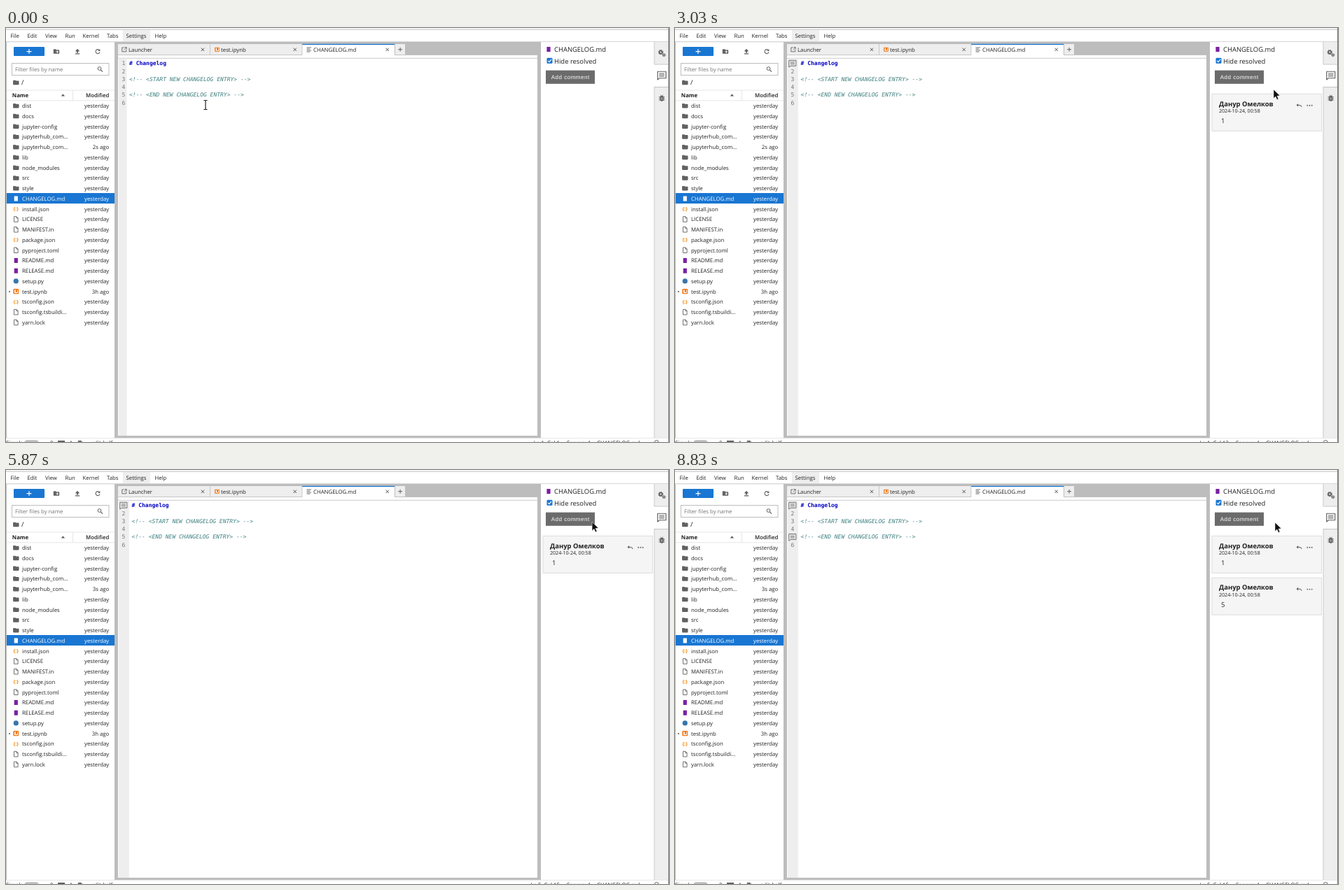
These frames come from a looping animation (947x592 px, 9230 ms). An HTML page:

```html
<!DOCTYPE html>
<html lang="en">
<head>
<meta charset="utf-8">
<title>Notebook comments</title>
<style>
  html, body { margin: 0; width: 100%; height: 100%; overflow: hidden; background: #fff; }
  svg { display: block; font: 7.8px "Open Sans", "Noto Sans", sans-serif; fill: #212121; text-rendering: geometricPrecision; }
  text { white-space: pre; }
  .mono { font-family: "DejaVu Sans Mono", monospace; font-size: 8px; }
  .note { fill: #408080; font-style: italic; }
  .head { fill: #0606c4; font-weight: bold; }
  .num { fill: #777; text-anchor: end; }
  .end { text-anchor: end; }
  .mid { text-anchor: middle; }
  .semi { font-weight: 600; }
  .bold { font-weight: bold; }
  .big { font-size: 9.45px; }
  .title { font-size: 10.5px; font-weight: bold; }
  .small { font-size: 7.1px; }
  .btn { font-family: "Liberation Sans", Arial, sans-serif; font-size: 8px; letter-spacing: .5px; }
  .dim { fill: #757575; }
  .white { fill: #fff; }
</style>
</head>
<body>
<svg id="stage" width="947" height="592" viewBox="0 0 947 592" xmlns="http://www.w3.org/2000/svg"></svg>
<script>
const LOOP = 9230;
const USER = "Данур Омелков";
const BLUE = "#1976d2", GREY = "#616161", LINE = "#bdbdbd", BUTTON = "#6b6b6b";

const rect = (x, y, w, h, fill, more = "") =>
  `<rect x="${x}" y="${y}" width="${w}" height="${h}" fill="${fill}" ${more}/>`;
const text = (x, y, str, cls = "", more = "") =>
  `<text x="${x}" y="${y}" class="${cls}" ${more}>${str.replace(/</g, "&lt;")}</text>`;
const path = (d, fill, more = "") => `<path d="${d}" fill="${fill}" ${more}/>`;
const line = (d, color = GREY, width = 1) =>
  path(d, "none", `stroke="${color}" stroke-width="${width}"`);
const group = (id, body, x = 0, y = 0) =>
  `<g id="${id}" transform="translate(${x} ${y})">${body}</g>`;
const at = (x, y, body, k = 1) => `<g transform="translate(${x} ${y}) scale(${k})">${body}</g>`;

// Icons are centred on 0,0
const icons = {
  folder: () => path("M-4.2-2.5Q-4.2-3.3-3.4-3.3H-.9L0-2.4H3.4Q4.2-2.4 4.2-1.6V2.4Q4.2 3.2 3.4 3.2H-3.4Q-4.2 3.2-4.2 2.4Z", GREY),
  md: c => rect(-2.6, -3.5, 5.2, 7, c || "#7b1fa2"),
  json: () => text(0, 2.5, "{:}", "mid bold", 'font-size="7" style="fill:#ef8a10"'),
  file: () => line("M-2.8-3.8H.8L2.8-1.8V3.8H-2.8ZM.6-3.8V-1.6H2.8", GREY, .9),
  py: () => `<circle r="3.6" fill="#3776ab"/>`,
  book: () => rect(-3.8, -3.6, 7.6, 7.2, "#ef6c00", 'rx=".8"') +
    rect(-2.3, -2.4, 5, 4.8, "#fff") + path("M-.6-2.4H1.8V1.6L.6.5-.6 1.6Z", "#ef6c00"),
  bubble: () => path("M-5-4.5H5V3.4H-2.8L-5 5.2Z", "#fff", `stroke="${GREY}" stroke-width=".95" stroke-linejoin="round"`) +
    line("M-3.2-2.2H3.2M-3.2-.5H3.2M-3.2 1.2H3.2", GREY, .8),
  close: () => line("M-2.2-2.2L2.2 2.2M2.2-2.2L-2.2 2.2", "#444", .9),
  gear: () => `<circle r="2.2" fill="none" stroke="${GREY}" stroke-width="1.9"/>` +
    `<circle r="3.4" fill="none" stroke="${GREY}" stroke-width="1.4" stroke-dasharray="1.5 1.17"/>`,
  bug: () => path("M-2.6-1.4Q-2.6-3.6 0-3.6T2.6-1.4V1.4Q2.6 4.4 0 4.4T-2.6 1.4Z", GREY) +
    line("M-4.2-1.6H4.2M-4.2.6H4.2M-4.2 2.8H4.2M-1.8-4.6L-.8-3.4M1.8-4.6L.8-3.4", GREY, .9) +
    line("M-1.1-.3H1.1M-1.1 1.6H1.1", "#fff", .7),
};

const button = (x, y, w, h, label, fill = BUTTON, id = "") =>
  rect(x, y, w, h, fill, id && `id="${id}"`) +
  text(x + w / 2 + .2, y + h / 2 + 2.7, label, "btn mid white");

function menuBar() {
  const items = [["File", 6.5], ["Edit", 30.5], ["View", 56], ["Run", 84.5], ["Kernel", 109.5],
    ["Tabs", 144], ["Settings", 171.5], ["Help", 212.5]];
  return rect(0, 1.5, 947, 1.2, "#c8c8c8") + rect(167, 3, 39, 16, "#eee") +
    items.map(([s, x]) => text(x, 13.6, s)).join("") + rect(0, 19.4, 947, .8, LINE);
}

function fileBrowser() {
  const files = `folder dist,folder docs,folder jupyter-config,folder jupyterhub_com…,folder jupyterhub_com…,
    folder lib,folder node_modules,folder src,folder style,md CHANGELOG.md,json install.json,file LICENSE,
    file MANIFEST.in,json package.json,file pyproject.toml,md README.md,md RELEASE.md,py setup.py,
    book test.ipynb,json tsconfig.json,file tsconfig.tsbuildi…,file yarn.lock`
    .split(",").map(s => s.trim().split(" "));
  const rows = files.map(([kind, name], i) => {
    const y = 111.2 + i * 14.75, on = i === 9, cls = on ? "white" : "";
    const when = i === 4 ? "2s ago" : i === 18 ? "3h ago" : "yesterday";
    return (on ? rect(1, 236, 154, 15, BLUE) : "") +
      at(14.3, y, icons[kind](on && "#fff")) + text(23, y + 2.9, name, cls) +
      text(147.3, y + 2.9, when, "end " + cls, i === 4 ? 'id="ago"' : "") +
      (i === 18 ? `<circle cx="5" cy="${y + .3}" r="1.1" fill="${GREY}"/>` : "");
  }).join("");
  return rect(0, 20, 1, 566, LINE) +
    rect(11, 27, 44, 13, BLUE, 'rx="1"') + line("M29.5 33.6H36.5M33 30.1V37.1", "#fff", 1.1) +
    at(72, 33.6, icons.folder() + line("M1.3-1.5V2.3M-.6.4H3.2", "#fff", .9)) +
    path("M102 29.7L105.2 33.2H103.2V35.4H100.8V33.2H98.8ZM98.8 36.3H105.2V37.5H98.8Z", GREY) +
    line("M133.5 31.8A3 3 0 1 0 134 34.3", GREY, 1.1) + path("M134.3 29.9V33H131.2Z", GREY) +
    rect(8.5, 50.5, 138.5, 17, "#fff", `stroke="${LINE}" stroke-width="1"`) +
    text(13, 62, "Filter files by name", "dim") +
    `<circle cx="133.5" cy="58" r="2.4" fill="none" stroke="${GREY}"/>` + line("M135.3 59.8L138 62.5", GREY, 1.2) +
    at(14.3, 78, icons.folder()) + text(22, 81.4, "/", "big") +
    rect(1, 88.6, 154, .8, "#e0e0e0") + rect(1, 103.4, 154, .8, "#e0e0e0") + rect(95, 89, .8, 15, "#e0e0e0") +
    text(8.8, 98.6, "Name", "bold") + path("M78.7 97.4L81.4 94.2 84.1 97.4Z", GREY) +
    text(147.3, 99.4, "Modified", "end semi") + rows;
}

function editor() {
  const tab = (x, name, icon) => text(x, 33.6, name) + icon;
  const code = [["# Changelog", "head"], , ["<!-- <START NEW CHANGELOG ENTRY> -->", "note"], ,
    ["<!-- <END NEW CHANGELOG ENTRY> -->", "note"]];
  const lineY = i => 53.4 + i * 11.25;
  let nums = "", body = "";
  for (let i = 0; i < 6; i++) {
    nums += text(170.3, lineY(i), String(i + 1), "mono num", `id="n${i + 1}"`);
    if (code[i]) body += text(176, lineY(i), code[i][0], "mono " + code[i][1]);
  }
  return rect(155, 20, 609, 566.5, LINE) + rect(160, 23, 395, 15.5, "#eee") +
    rect(160, 38.5, 599, 544.5, "#fff") + rect(160, 38, 263, .8, LINE) + rect(555, 38, 204, .8, LINE) +
    rect(423, 23, 132, 16, "#fff") + rect(423, 22.8, 132, 1.3, BLUE) +
    rect(160, 42.8, 599, .8, LINE) +
    [291, 422.5, 555].map(x => rect(x, 23, .8, 15.5, LINE)).join("") +
    tab(175, "Launcher", line("M168.5 28H165.8V33.8H171.8V31M169.5 27.6H172.2V30.3M172 27.8L168.6 31.2", GREY, .9)) +
    tab(307, "test.ipynb", at(301.5, 30.7, icons.book(), .85)) +
    tab(439, "CHANGELOG.md", line("M429.5 28H436M429.5 30H434M429.5 32H436M429.5 34H434.5", GREY, .9)) +
    [281, 412.7, 544.7].map(x => at(x, 30.8, icons.close())).join("") +
    rect(556, 23, 14, 15, "#eee") +
    line("M560.2 30.7H566M563.1 27.8V33.6", GREY, 1) +
    rect(161, 43.6, 11.5, 539.4, "#eee", 'id="gutter"') + nums + group("code", body) +
    group("mark1", icons.bubble(), 167.8, 50.8) + group("mark2", icons.bubble(), 167.8, 96) +
    rect(0, 0, 1, 10, "#000", 'id="caret"');
}

function commentCard(id, str) {
  return group(id, rect(767, .5, 156.5, 53, "#f5f5f5", 'stroke="#ddd" stroke-width="1"') +
    text(777, 17.8, USER, "bold", 'font-size="9.45"') + text(777, 27.6, "2024-10-24, 00:58", "small") +
    text(780, 42.4, str, "big") +
    line("M888.6 16.5H892Q895 16.5 895 19.2", GREY, 1) + path("M887.5 16.5L890.2 14.2V18.8Z", GREY) +
    [903.3, 906.5, 909.7].map(x => `<circle cx="${x}" cy="17" r=".95" fill="${GREY}"/>`).join(""));
}

function sidePanel() {
  return rect(764, 20, 162, 566, "#fff") + at(775, 30.5, icons.md()) +
    text(783, 34.2, "CHANGELOG.md", "big") +
    rect(772.5, 42.8, 8, 8, BLUE, 'rx="1.2"') + line("M774.2 46.9L775.9 48.6 779 44.9", "#fff", 1.2) +
    text(783, 50.5, "Hide resolved", "big") +
    group("addNew", button(771, 60.6, 70, 19.2, "Add comment")) +
    group("form", rect(767, 66.5, 156.5, 88, "#f5f5f5", 'stroke="#e4e4e4" stroke-width="1"') +
      text(774, 82, USER, "title") +
      rect(774.3, 91.8, 142.2, 28.6, "#e0e0e0", 'stroke="#6aaae4" stroke-width="1.8"') +
      text(779.5, 103.8, "Comment", "mono dim", 'id="hint" style="font-size:9.6px"') +
      text(779.5, 103.8, "", "mono", 'id="draft" style="font-size:9.6px"') +
      rect(779.3, 95, 1, 12, "#222", 'id="inputCaret"') +
      button(840, 126.8, 43, 19.2, "Cancel") + button(885, 126.8, 30.5, 19.2, "Add", "#b3b3b3", "send")) +
    commentCard("card1", "1") + commentCard("card2", "5") +
    rect(926, 20, 21, 566, "#eee") + rect(926, 52, 21, 32, "#fff") + rect(925.6, 20, .8, 32, LINE) +
    rect(925.6, 84, .8, 502, LINE) + rect(926, 51.6, 21, .8, LINE) + rect(926, 84, 21, .8, LINE) +
    at(935.2, 34.6, icons.gear(), .9) + at(939.8, 38.6, icons.gear(), .62) +
    at(936.7, 67.7, icons.bubble(), 1.2) + at(936.7, 100.3, icons.bug()) +
    rect(946, 0, 1, 592, "#777");
}

function statusBar() {
  return rect(0, 586.5, 946, 5.5, "#fff") + rect(0, 586.3, 946, .7, "#ddd") +
    text(0, 595.5, "Simple") + rect(26, 589.3, 21, 9, LINE, 'rx="4.5"') +
    text(63, 595.5, "0") + rect(74, 590, 10, 8, GREY) + text(90, 595.5, "4") +
    at(105.5, 593.5, icons.gear()) + text(122, 595.5, "edit-half") +
    text(791, 595.5, "", "end", 'id="place"') + text(801, 595.5, "Spaces: 4") +
    text(844, 595.5, "CHANGELOG.md") + line("M926.5 594V592Q926.5 589.6 929.3 589.6T932 592V594", GREY, 1);
}

const arrow = path("M0 0V12.6L2.9 10 4.9 14.4 7 13.4 5 9.2 9 8.8Z", "#111", 'stroke="#fff" stroke-width=".5"');
const beam = line("M-2.6-6.5H-1Q0-6.5 0-5.5V5.5Q0 6.5-1 6.5H-2.6M2.6-6.5H1Q0-6.5 0-5.5M2.6 6.5H1Q0 6.5 0 5.5", "#222", 1.2);

const stage = document.getElementById("stage");
stage.innerHTML = menuBar() + fileBrowser() + editor() + sidePanel() + statusBar() +
  group("arrow", arrow) + group("beam", beam);

const el = {};
stage.querySelectorAll("[id]").forEach(n => el[n.id] = n);
const show = (id, on) => el[id].style.display = on ? "" : "none";
const move = (id, x, y) => el[id].setAttribute("transform", `translate(${x} ${y})`);
const write = (id, s) => { if (el[id].textContent !== s) el[id].textContent = s; };
const within = (t, ...spans) => spans.some(([a, b]) => t >= a && t < b);

// time, x, y, easing power of the move that ends here
const track = [
  [0, 285, 110], [30, 285, 110], [250, 262, 47, 1], [470, 255, 48, .6],
  [830, 255, 48], [1170, 761, 64, 1.4], [1450, 803, 70, .6], [1730, 827, 71, 1],
  [1800, 827, 71], [1830, 831, 76, 1], [2030, 831, 76], [2270, 835, 76, 1],
  [2930, 835, 76], [3030, 855, 88, 1], [3530, 855, 88], [3860, 560, 87, 1.5],
  [4200, 250, 96, .6], [5000, 250, 96], [5370, 697, 13, 1.4], [5600, 874, 44, .6],
  [5900, 835, 76, .8], [8800, 835, 76], [8830, 857, 75, 1], [LOOP, 857, 75],
];

function pointer(t) {
  const i = track.findIndex(k => k[0] > t);
  const [t0, x0, y0] = track[i - 1], [t1, x1, y1, p = 1] = track[i];
  const u = (t - t0) / (t1 - t0);
  const k = p < 1 ? 1 - (1 - u) ** (1 / p) : u ** p;
  return [x0 + (x1 - x0) * k, y0 + (y1 - y0) * k];
}

function draw(t) {
  const first = t >= 2930, second = t >= 7530;
  const form = within(t, [1700, 2930], [5970, 7530]);
  const draft = within(t, [2070, 2930]) ? "1" : within(t, [7030, 7530]) ? "5" : "";

  // editor
  el.gutter.setAttribute("width", first ? 14.8 : 11.5);
  move("code", first ? 3.6 : 0, 0);
  show("n1", !first);
  show("n5", !second);
  show("mark1", first);
  show("mark2", second);
  const lower = t >= 4230;
  show("caret", within(t, [670, 1200], [4230, 4830], [5330, 5830]));
  el.caret.setAttribute("x", lower ? 246.4 : 228.4);
  el.caret.setAttribute("y", lower ? 91 : 46);
  write("place", lower ? "Ln 5, Col 15" : t >= 670 ? "Ln 1, Col 12" : "Ln 1, Col 1");
  write("ago", t >= 5500 ? "3s ago" : "2s ago");

  // comments
  show("addNew", !form);
  show("form", form);
  show("hint", !draft);
  write("draft", draft);
  el.send.setAttribute("fill", draft ? BUTTON : "#b3b3b3");
  show("inputCaret", within(t, [1700, 2630], [5970, 6570], [7030, 7530]));
  el.inputCaret.setAttribute("x", draft ? 784.8 : 779.3);
  show("card1", first);
  show("card2", second);
  move("card1", 0, form ? 167.4 : 93.8);
  move("card2", 0, 153.6);

  // pointer
  const [x, y] = pointer(t);
  const isBeam = (x < 762 && y > 43) || within(t, [1830, 2930], [5970, 7530]);
  show("beam", isBeam);
  show("arrow", !isBeam);
  move(isBeam ? "beam" : "arrow", x, y);
}

const start = performance.now();
function tick() {
  draw((performance.now() - start) % LOOP);
  requestAnimationFrame(tick);
}
tick();
</script>
</body>
</html>
```
